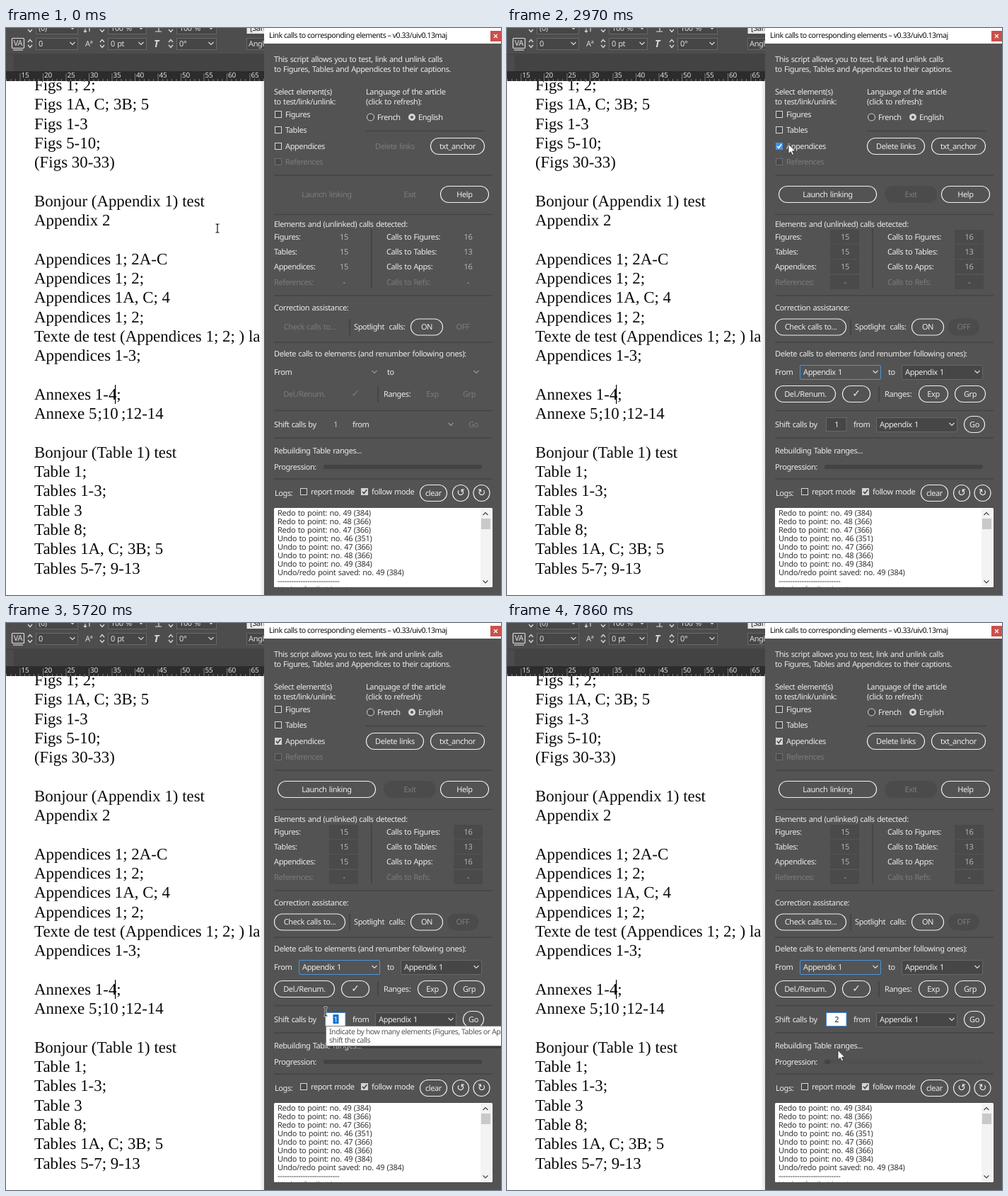
These frames come from a looping animation (700x801 px, 8000 ms). An HTML page:

```html
<!DOCTYPE html>
<html lang="en">
<head>
<meta charset="utf-8">
<title>Link calls panel</title>
<style>
html, body { margin: 0; width: 100%; height: 100%; overflow: hidden; background: #535353; }
svg { display: block; width: 700px; height: 801px; }
text { font: 11px "Noto Sans", sans-serif; letter-spacing: -.4px; word-spacing: .8px; fill: #ececec; text-rendering: geometricPrecision; white-space: pre; }
.mid { text-anchor: middle; }
text.doc { font: 22.9px "Liberation Serif", serif; letter-spacing: 0; word-spacing: 0; fill: #0a0a0a; }
text.tip { font-size: 10.6px; letter-spacing: -.47px; word-spacing: 0; fill: #575757; }
text.title { font-size: 10.6px; letter-spacing: -.47px; word-spacing: 0; fill: #111; }
text.log { letter-spacing: -.3px; fill: #333; }
text.num { fill: #b4b4b4; }
text.dim { fill: #7c7c7c; }
text.bar { fill: #dcdcdc; }
text.rule { font-size: 10px; letter-spacing: -.1px; fill: #e0e0e0; }
text.sym { font: 14px "DejaVu Sans", sans-serif; }
.sep { stroke: #434343; stroke-width: 1.6; }
.mark { stroke: #ddd; stroke-opacity: .45; }
.pill { fill: none; stroke: #f2f2f2; stroke-width: 1.2; }
.pill.hot { fill: #6a6a6a; }
.field { fill: #464646; stroke: #686868; }
#from { fill: #545454; stroke: #4b93dc; }
.box { fill: #494949; stroke: #d8d8d8; }
.line { fill: none; stroke: #ddd; stroke-width: 1.2; }
.gate { visibility: hidden; }
.on .gate { visibility: visible; }
svg:not(.on) .gated { fill: #7c7c7c; }
svg:not(.on) .chev { stroke: #989898; }
</style>
</head>
<body>
<script>
const el = (name, attrs, body = '') =>
  `<${name} ${Object.entries(attrs).map(([k, v]) => `${k}="${v}"`).join(' ')}>${body}</${name}>`;
// y is the visual middle of the line; baselines sit on whole pixels
const text = (x, y, s, cls = '') => el('text', { x, y: Math.floor(y + 4), class: cls }, s);
const mid = (x, y, s, cls = '') => text(x, y, s, 'mid ' + cls);
const rect = (x, y, w, h, attrs) => el('rect', { x, y, width: w, height: h, ...attrs });
const line = (x1, y1, x2, y2, cls = 'sep') => el('line', { x1, y1, x2, y2, class: cls });
const path = (d, attrs) => el('path', { d, ...attrs });
const chevron = (x, y, cls = 'line chev') => path(`M${x - 3.5} ${y - 2}l3.5 3.5 3.5-3.5`, { class: cls });

const pill = (x, y, w, label, gated = true, cls = '') =>
  rect(x + .5, y + .5, w - 1, 23, { rx: 11.5, class: 'pill' + (gated ? ' gate' : ''), 'data-hit': [x, y, w, 24] }) +
  mid(x + w / 2, y + 12, label, (gated ? 'gated ' : '') + cls);
const ghost = (x, y, w, label) =>
  rect(x, y, w, 24, { rx: 12, class: 'gate', fill: '#4b4b4b' }) + mid(x + w / 2, y + 12, label, 'dim');
const select = (x, y, id) =>
  rect(x + .5, y + .5, 114, 20, { rx: 1.5, class: 'field gate', id }) +
  text(x + 5, y + 10, 'Appendix 1', 'gate') + chevron(x + 107, y + 10);
const check = (x, y, label, cls = '') =>
  rect(x - 4.5, Math.floor(y) - 4.5, 9, 9, { class: 'box', ...(cls && { style: 'stroke:#707070' }) }) +
  text(x + 10, y, label, cls);
const tick = (x, y, attrs) => path(`M${x - 3} ${y}l2.2 2.5 4-5.2`, { fill: 'none', 'stroke-width': 1.6, ...attrs });

function documentPart() {
  const lines = ['Figs 1; 2;', 'Figs 1A, C; 3B; 5', 'Figs 1-3', 'Figs 5-10;', '(Figs 30-33)', '',
    'Bonjour (Appendix 1) test', 'Appendix 2', '',
    'Appendices 1; 2A-C', 'Appendices 1; 2;', 'Appendices 1A, C; 4', 'Appendices 1; 2;',
    'Texte de test (Appendices 1; 2; ) la s', 'Appendices 1-3;', '',
    'Annexes 1-4;', 'Annexe 5', '',
    'Bonjour (Table 1) test', 'Table 1;', 'Tables 1-3;', 'Table 3', 'Table 8;',
    'Tables 1A, C; 3B; 5', 'Tables 5-7; 9-13'];
  const put = (x, i, s) => el('text', { x, y: 88 + 27.3 * i, class: 'doc' }, s);
  let s = rect(0, 0, 365, 801, { fill: '#fff' });
  lines.forEach((l, i) => { if (l) s += put(40, i, l); });
  s += put(129.5, 17, ';10') + put(163, 17, ';12-14');
  s += rect(154, 504, 1.2, 27, { id: 'caret', fill: '#000' });
  return s + rect(359, 75, 6, 726, { fill: 'url(#shade)' });
}

function toolbar() {
  const spin = (x, y) => path(`M${x - 3} ${y - 2}l3-3.5 3 3.5M${x - 3} ${y + 2}l3 3.5 3-3.5`, { class: 'line' });
  const input = (x, w, upper, lower) => [[0, upper], [22, lower]].map(([y, s]) =>
    rect(x + .5, y - 7.5, w, 16, { class: 'field' }) + text(x + 4, y, s, 'bar') +
    spin(x - 8, y) + chevron(x + w - 7, y, 'line')).join('');
  let s = rect(0, 0, 365, 37, { fill: '#4d4d4d' }) + rect(0, 37, 365, 24, { fill: '#434343' }) +
    rect(0, 37, 11, 24, { fill: '#4b4b4b' }) + line(0, 37, 365, 37) + line(11.5, 37, 11.5, 61);
  s += input(42, 59, '(0)', '0') + input(144, 54, '100 %', '0 pt') + input(241, 56, '100 %', '0°');
  s += rect(8.5, 14.5, 17, 14, { rx: 1, class: 'line' }) + mid(17, 21, 'VA', 'bar') +
    line(10, 31, 24, 31, 'line') +
    text(112, 22, 'Aª', 'bar') + path('M112 1v5m-2-2l2 2 2-2M118 5V-3h6', { class: 'line' }) +
    el('text', { x: 209, y: 27, class: 'bar', style: 'font-size:14px;font-style:italic;font-weight:700' }, 'T') +
    path('M211 5h9M216 5V-3', { class: 'line' });
  s += rect(340.5, -9, 30, 17, { fill: '#e9e9e9' }) + el('text', { x: 345, y: 4, style: 'fill:#222' }, '[San') +
    rect(340.5, 14.5, 30, 16, { class: 'field' }) + text(343, 22, 'Angla', 'bar');
  s += rect(0, 61, 365, 14, { fill: '#2c2c2c' });
  for (let i = -5; i < 54; i++) {
    const x = 20 + i * 6.5;
    s += line(x, i % 5 ? 72 : 64, x, 75, 'mark');
    if (i % 5 === 0) s += text(x + 1.5, 66, 15 + i, 'rule');
  }
  return s;
}

function panel() {
  let s = rect(365, 0, 335, 801, { fill: '#535353' }) + rect(365, 0, 335, 22, { fill: '#fff' });
  s += text(372, 10, 'Link calls to corresponding elements – v0.33/uiv0.13maj', 'title');
  s += rect(685, 4, 15, 15, { fill: '#c9504c' }) + path('M690 9l5 5m0-5l-5 5', { class: 'line', style: 'stroke:#fff' });
  for (const y of [208, 263.5, 378, 444, 540.5, 579, 637]) s += line(379, y, 688, y);
  s += line(509, 145.5, 677, 145.5) + line(517, 284, 517, 368) + line(486, 411, 486, 434) + line(526, 506, 526, 528);

  s += text(379, 44, 'This script allows you to test, link and unlink calls') +
    text(379, 58, 'to Figures, Tables and Appendices to their captions.') +
    text(379, 90, 'Select element(s)') + text(379, 104, 'to test/link/unlink:') +
    text(509, 90, 'Language of the article') + text(509, 104, '(click to refresh):');
  s += check(385, 122, 'Figures') + check(385, 144.5, 'Tables') + check(385, 167, 'Appendices') +
    check(385, 189, 'References', 'dim');
  s += el('g', { id: 'picked' }, rect(380, 162, 10, 10, { rx: 1, id: 'pickFill' }) + tick(385, 167, { id: 'pickTick' }));
  s += el('circle', { cx: 515.5, cy: 126, r: 5, class: 'box' }) + text(525, 126, 'French') +
    el('circle', { cx: 574, cy: 126, r: 5, fill: '#d6d6d6' }) + el('circle', { cx: 574, cy: 126, r: 2, fill: '#555' }) +
    text(583, 126, 'English');
  s += pill(509, 155, 82, 'Delete links') + pill(600, 155, 77, 'txt_anchor', false) +
    pill(384, 223, 139, 'Launch linking') + ghost(534, 223, 74, 'Exit') + pill(614, 223, 69, 'Help', false);

  s += text(379, 277, 'Elements and (unlinked) calls detected:');
  [['Figures:', 15, 'Calls to Figures:', 16], ['Tables:', 15, 'Calls to Tables:', 13],
    ['Appendices:', 15, 'Calls to Apps:', 16], ['References:', '-', 'Calls to Refs:', '-']].forEach((r, i) => {
    const y = 295 + 21.4 * i, dim = i > 2 ? 'dim' : '';
    for (const x of [457, 633]) s += rect(x, Math.floor(y) - 10, 41, 20, { class: 'gate', fill: '#4a4a4a' });
    s += text(379, y, r[0], dim) + mid(478, y, r[1], 'num') + text(538, y, r[2], dim) + mid(653.5, y, r[3], 'num');
  });

  s += text(379, 395, 'Correction assistance:') + pill(379, 410.5, 101, 'Check calls to...') +
    text(492, 422.5, 'Spotlight\u00a0 calls:') + pill(572, 410.5, 46, 'ON', false) + ghost(624, 410.5, 44, 'OFF');
  s += text(379, 460.5, 'Delete calls to elements (and renumber following ones):') +
    text(379, 486, 'From') + select(414, 476, 'from') + text(539, 486, 'to') + select(558, 476, 'to');
  s += pill(379, 505, 86, 'Del./Renum.') + pill(474, 505, 40, '✓', true, 'sym') + text(534, 517, 'Ranges:') +
    pill(582, 505, 42, 'Exp') + pill(633, 505, 44, 'Grp');
  s += text(379, 560, 'Shift calls by') + rect(451.5, 550.5, 28.5, 19, { class: 'field gate', id: 'count' }) +
    rect(462.5, 553, 8, 13, { id: 'mark', fill: '#0b74d1' }) + mid(466.3, 560, '1', 'count') +
    rect(463, 552, 1, 13, { id: 'bar', fill: '#111' }) +
    text(490, 560, 'from') + select(522, 550, 'start') + pill(646, 548, 30, 'Go');
  s += text(379, 597.5, 'Rebuilding Table ranges...') + text(379, 620, 'Progression:') +
    rect(449, 617, 224, 6, { rx: 3, id: 'track' }) + rect(449, 617, 8, 6, { rx: 3, fill: '#434343' });

  s += text(380, 657, 'Logs:') + check(421, 655, 'report mode') + check(507, 655, 'follow mode') +
    rect(502, 650, 10, 10, { rx: 1, fill: '#d4d4d4' }) + tick(507, 655, { stroke: '#444' }) +
    pill(585, 645, 39, 'clear', false) + pill(631, 645, 24, '↺', false, 'sym') + pill(660.5, 645, 24, '↻', false, 'sym');
  const undo = [['Redo', 49, 384], ['Redo', 48, 366], ['Redo', 47, 366], ['Undo', 46, 351],
    ['Undo', 47, 366], ['Undo', 48, 366], ['Undo', 49, 384]].map(([a, n, p]) => `${a} to point: no. ${n} (${p})`);
  undo.push('Undo/redo point saved: no. 49 (384)', '-'.repeat(27), 'Undo of calls (done)');
  s += rect(379, 678, 309, 112, { rx: 1.5, fill: '#fff' }) +
    el('g', { 'clip-path': 'url(#logClip)' }, undo.map((l, i) => text(384, 685 + 12 * i, l, 'log')).join(''));
  s += rect(671, 679, 15, 110, { fill: '#f3f3f3' }) + rect(672, 693, 13, 15, { fill: '#c9c9c9' }) +
    path('M674.5 688l3.5-3.5 3.5 3.5M674.5 780.5l3.5 3.5 3.5-3.5', { class: 'line', style: 'stroke:#444' });
  return s;
}

const tooltip = (id, x, y, h, a, b) => el('g', { id },
  rect(x + 3, y + 3, 260, h, { fill: '#000', opacity: .25 }) +
  rect(x + .5, y + .5, 260, h - 1, { fill: '#fff', stroke: '#808080' }) +
  text(x + 5, y + 8, a, 'tip') + text(x + 5, y + 20.5, b, 'tip'));

const beam = 'M-2.5-6H-.8L0-5.2.8-6H2.5M0-5.2V5.2M-2.5 6H-.8L0 5.2.8 6H2.5';
document.body.innerHTML = el('svg', { xmlns: 'http://www.w3.org/2000/svg', viewBox: '0 0 700 801', id: 'stage' },
  '<defs><linearGradient id="shade"><stop stop-color="#fff"/><stop offset="1" stop-color="#e2e2e2"/></linearGradient>' +
  '<clipPath id="logClip"><rect x="379" y="678" width="292" height="111.5"/></clipPath></defs>' +
  documentPart() + toolbar() + panel() +
  tooltip('tipShift', 452, 569, 29, 'Indicate by how many elements (Figures, Tables or Appendices) to', 'shift the calls') +
  tooltip('tipLine', 468, 621, 29, 'This line indicates what the script is actually doing.', 'More details are written in the log window.') +
  el('g', { id: 'beam', fill: 'none' }, path(beam, { stroke: '#fff', 'stroke-width': 2.6 }) + path(beam, { stroke: '#111', 'stroke-width': 1.2 })) +
  path('M0 0V13.6L3.2 10.7 5.4 15.4 7.6 14.4 5.5 9.9H9.8Z', { id: 'arrow', fill: '#fff', stroke: '#222', 'stroke-width': .8 }));

const $ = id => document.getElementById(id);
const stage = $('stage'), digit = document.querySelector('.count');
const hits = [...document.querySelectorAll('.pill')].map(node => ({ node, r: node.dataset.hit.split(',').map(Number) }));

// start, end, number of steps, Bezier points
const moves = [
  [280, 1230, 8, [[299, 283], [330, 30], [380, -10], [386, 195]]],
  [1380, 1650, 3, [[386, 195], [398, 164]]],
  [3680, 4640, 8, [[398, 164], [440, 513]]],
  [4760, 5180, 4, [[440, 513], [469, 555]]],
  [5310, 5720, 4, [[469, 555], [452, 549]]],
  [6010, 6280, 3, [[452, 549], [468, 603.5]]]
];
function bezier(p, u) {
  while (p.length > 1) p = p.slice(1).map((b, i) => b.map((v, k) => p[i][k] + (v - p[i][k]) * u));
  return p[0];
}
function pointer(t) {
  let p = moves[0][3][0];
  for (const [a, b, n, pts] of moves) {
    if (t < a) break;
    p = bezier(pts, Math.min(n, Math.floor((t - a) / (b - a) * (n - 1) + 1e-6) + 1) / n);
  }
  return p;
}
const show = (node, yes) => node.setAttribute('display', yes ? 'inline' : 'none');
const within = (t, a, b) => t >= a && t < b;

function draw(t) {
  const on = t >= 2820, editing = t >= 5310, typed = t >= 7300;
  stage.classList.toggle('on', on);
  show($('caret'), !(within(t, 550, 1090) || within(t, 1510, 1960) || within(t, 2390, 2820)));

  show($('picked'), t >= 2670);
  $('pickFill').setAttribute('fill', editing ? '#d4d4d4' : '#3f93ea');
  $('pickTick').setAttribute('stroke', editing ? '#444' : '#fff');

  $('count').style.cssText = editing ? 'fill:#fff;stroke:#3d8bdc' : '';
  show($('mark'), editing && !typed);
  digit.textContent = typed ? '2' : '1';
  digit.style.fill = typed ? '#222' : editing ? '#fff' : on ? '#ececec' : '#c4c4c4';
  show($('bar'), within(t, 6280, 6870) || within(t, 7300, 7860));
  $('bar').setAttribute('x', typed ? 469 : 463);
  $('track').setAttribute('fill', t < 6280 ? '#434343' : '#505050');

  show($('tipShift'), within(t, 5720, 6010));
  show($('tipLine'), within(t, 6280, 7300));

  const [x, y] = pointer(t);
  const overField = on && x > 448 && x < 482 && y > 546 && y < 572;
  const isBeam = x < 362 && y > 75 || overField;
  show($('beam'), isBeam);
  show($('arrow'), !isBeam);
  $(isBeam ? 'beam' : 'arrow').setAttribute('transform', `translate(${x} ${y})`);
  for (const { node, r } of hits)
    node.classList.toggle('hot', on && x >= r[0] && x <= r[0] + r[2] && y >= r[1] && y <= r[1] + r[3]);
}

const begin = performance.now();
function frame() {
  draw((performance.now() - begin) % 8000);
  requestAnimationFrame(frame);
}
draw(0);
requestAnimationFrame(frame);
</script>
</body>
</html>
```
